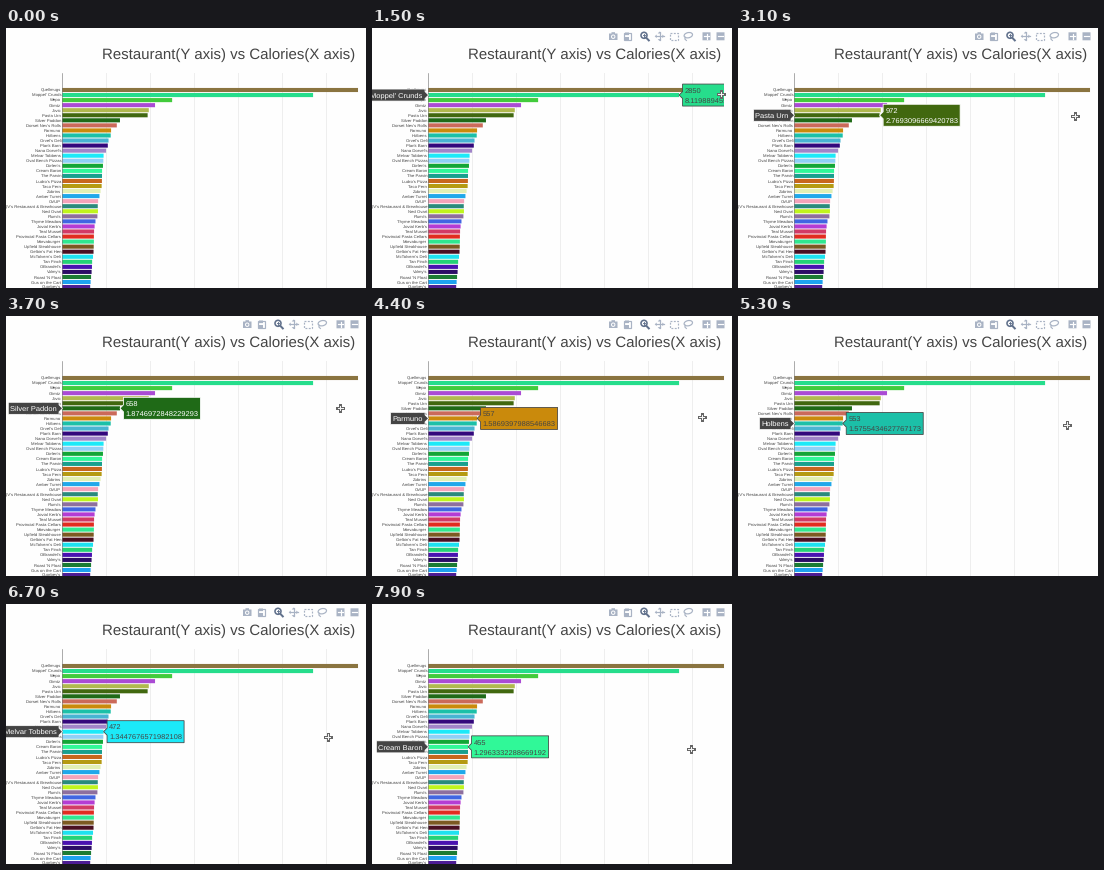
Write a matplotlib script that moves like this. It is 360 px wide and 260 px high and loops after 8000 ms.

```python
import matplotlib.pyplot as plt
import numpy as np
from matplotlib.animation import FuncAnimation
from matplotlib.patches import Circle, Ellipse, Polygon, Rectangle

W, H, DPI = 360, 260, 100
PT = 72 / DPI            # points per pixel
X0, Y0 = 56, 62          # left end and centre of the first bar
SCALE, PITCH = 0.0881, 5.053
MEAN = 350.99
CLIP_X = 352
DARK, ICON, ACTIVE = "#444444", "#a9b3c4", "#61718c"

plt.rcParams.update({"font.family": "Liberation Sans", "text.hinting": "none"})

BARS = [
    ("Quellmugs", 3360, "#8a7440"), ("Moppel' Crunds", 2850, "#26dd8c"),
    ("Wepo", 1250, "#42cb3c"), ("Glimtz", 1056, "#aa4bd4"),
    ("Jovic", 985, "#b0b94e"), ("Pasta Urn", 972, "#41680f"),
    ("Silver Paddon", 658, "#1f6a17"), ("Dorset Nev's Rolls", 622, "#cb6a5a"),
    ("Parmuno", 557, "#ca8a0c"), ("Holbens", 553, "#1cc0a8"),
    ("Orvel's Deli", 528, "#48b4d2"), ("Plank Barn", 520, "#33087c"),
    ("Nana Dorvel's", 500, "#a084c8"), ("Melvar Tobbens", 472, "#1ce9f8"),
    ("Oval Bench Pizzas", 469, "#8fd0f6"), ("Dorlen's", 465, "#12a636"),
    ("Cream Baron", 455, "#30f898"), ("The Parvin", 454, "#18a08e"),
    ("Ludro's Pizza", 453, "#c8661e"), ("Taco Fern", 450, "#b59a12"),
    ("Zubrins", 438, "#e2efb4"), ("Amber Turret", 425, "#20a8ea"),
    ("OVUP", 410, "#f4a3ba"), ("QV's Restaurant & Brewhouse", 406, "#2a8a7c"),
    ("Ned Ovart", 408, "#c0f51d"), ("Plumi's", 402, "#8e6f9e"),
    ("Thyme Meadow", 380, "#4166e2"), ("Jovial Kerb's", 370, "#b43cd4"),
    ("Teal Mussel", 364, "#d23a66"), ("Provincial Pasta Cellars", 362, "#e22c20"),
    ("Morvaburger", 362, "#30e890"), ("Upfield Steakhouse", 360, "#7c5a22"),
    ("Gelbin's Fat Hen", 358, "#4a1022"), ("McTolvern's Deli", 352, "#1ee2f0"),
    ("Tan Finch", 342, "#24d276"), ("O'Brandel's", 340, "#4a12b0"),
    ("Volmy's", 336, "#2c0c66"), ("Roast 'N Float", 330, "#1c7c34"),
    ("Gus on the Cart", 325, "#1ea2f0"), ("Quorbey's", 320, "#4c1c94"),
]

# Frame at which each hover starts, and the bar under the pointer
HOVER_AT = [0, 8, 15, 17, 19, 20, 22, 36, 39, 43, 48, 54, 56, 60, 64, 71, 73, 76]
HOVER_BAR = [None] + list(range(17))

# Pointer path
PATH_T = [7, 10, 15, 23, 31, 34, 44, 51, 53, 58, 61, 67, 70, 79]
PATH_X = [356, 354, 348.5, 342, 336.5, 336.5, 329.5, 328.5, 328.5, 326.5,
          325, 321.5, 321.5, 318.5]
PATH_Y = [50, 61, 66, 83, 88, 88, 101, 108.5, 108.5, 118.5, 123, 132.5, 132.5, 145]
BAR_OFF, POINTER_ON = 6, 7

fig = plt.figure(figsize=(W / DPI, H / DPI), dpi=DPI, facecolor="#fefefe")
ax = fig.add_axes([0, 0, 1, 1])
ax.set(xlim=(0, W), ylim=(H, 0))
ax.axis("off")


def bar_y(k):
    return Y0 + k * PITCH


def label(x, y, s, px, color=DARK, **kw):
    """Text whose capitals are centred on y."""
    return ax.text(x, y + 0.36 * px, s, fontsize=px * PT, color=color,
                   va="baseline", **kw)


def stroke(xs, ys, color, px, z=2, **kw):
    return ax.plot(xs, ys, color=color, lw=px * PT, zorder=z, **kw)[0]


def add(patch):
    return ax.add_patch(patch)


def draw_chart():
    for k in range(1, 7):
        x = X0 + 500 * k * SCALE
        stroke([x, x], [45, H], "#eeeeee", 1, 0)
    for k, (name, cal, color) in enumerate(BARS):
        add(Rectangle((X0, bar_y(k) - 2.05), cal * SCALE, 4.1, fc=color, lw=0,
                      snap=False, zorder=1))
        label(X0 - 0.8, bar_y(k), name, 4.3, ha="right")
    stroke([X0, X0], [45, H], "#777777", 0.6)
    label(96, 25.5, "Restaurant(Y axis) vs Calories(X axis)", 15)


def draw_toolbar():
    def fill(x, y, w, h, color=ICON):
        return add(Rectangle((x, y), w, h, fc=color, lw=0, snap=False, zorder=3))

    def ring(cls, *args, color=ICON, px=1.2, **kw):
        return add(cls(*args, fc="none", ec=color, lw=px * PT, zorder=3, **kw))

    def hole(x, y, r):
        return add(Circle((x, y), r, fc="white", lw=0, zorder=4))

    parts = [
        # camera
        fill(237, 5.5, 8.5, 6.5), fill(239.5, 4.2, 3.5, 2),
        hole(241.2, 8.7, 2.2),
        add(Circle((241.2, 8.7), 1.2, fc=ICON, lw=0, zorder=5)),
        # disk
        ring(Rectangle, (251.5, 4.5), 7, 7.5),
        fill(253, 4.5, 4, 2.6), fill(253, 9, 4, 3),
        # zoom
        ring(Circle, (272, 7.3), 3, color=ACTIVE, px=1.6),
        stroke([274.2, 276.8], [9.7, 12.4], ACTIVE, 2, 3),
        stroke([270.6, 273.4], [7.3, 7.3], ACTIVE, 0.9, 3),
        stroke([272, 272], [5.9, 8.7], ACTIVE, 0.9, 3),
        # pan
        stroke([283.5, 291.5], [8.3, 8.3], ICON, 1.2, 3),
        stroke([287.5, 287.5], [4.3, 12.3], ICON, 1.2, 3),
        # box select
        ring(Rectangle, (297.5, 4.5), 8, 7.5, ls=(0, (1.6, 1.2))),
        # lasso
        ring(Ellipse, (316.3, 7.2), 8.5, 5.2, angle=-12),
        stroke([313.4, 312.8, 314.4], [9.2, 11, 12.5], ICON, 1.1, 3),
    ]
    for x in (334.5, 348.5):
        parts += [fill(x - 4, 4.3, 8, 8),
                  stroke([x - 2.4, x + 2.4], [8.3, 8.3], "white", 1.2, 4)]
    parts.append(stroke([334.5, 334.5], [5.9, 10.7], "white", 1.2, 4))
    for dx, dy in ((1, 0), (-1, 0), (0, 1), (0, -1)):
        tip = np.array([287.5 + 4.8 * dx, 8.3 + 4.8 * dy])
        back, side = np.array([dx, dy]) * 2, np.array([dy, dx]) * 1.8
        parts.append(add(Polygon([tip, tip - back + side, tip - back - side],
                                 fc=ICON, lw=0, zorder=3)))
    return parts


def callout(x, y, width, half, side):
    """Outline of a box whose arrow points at (x, y)."""
    near, far = x + 3.5 * side, x + (3.5 + width) * side
    return [(x, y), (near, y - 3.5), (near, y - half), (far, y - half),
            (far, y + half), (near, y + half), (near, y + 3.5)]


def is_dark(color):
    r, g, b = (int(color[k:k + 2], 16) for k in (1, 3, 5))
    return 0.299 * r + 0.587 * g + 0.114 * b < 128


draw_chart()
toolbar = draw_toolbar()

tag = add(Polygon([(0, 0)] * 3, fc=DARK, ec="white", lw=0.7 * PT, zorder=6))
tag_text = label(0, 0, "", 7.5, "white", ha="right", zorder=7)
tip = add(Polygon([(0, 0)] * 3, lw=0.8 * PT, zorder=6))
tip_lines = [label(0, 0, "", 7.5, zorder=7, clip_on=True) for _ in range(2)]
for part in [tip, *tip_lines]:
    part.set_clip_path(Rectangle((0, 0), CLIP_X, H, transform=ax.transData))

pointer = [stroke([], [], color, px, z)
           for color, px, z in (("#666666", 3, 8), ("#f4f4f4", 1, 9))]


def text_width(text):
    return text.get_window_extent().width * DPI / fig.dpi


def show_hover(k):
    parts = [tag, tag_text, tip, *tip_lines]
    for part in parts:
        part.set_visible(k is not None)
    if k is None:
        return
    name, cal, color = BARS[k]
    y, end = bar_y(k), X0 + cal * SCALE
    ink = "white" if is_dark(color) else DARK

    tag_text.set_text(name)
    tag_text.set_position((X0 - 5.5, y + 2.7))
    tag.set_xy(callout(X0 + 0.5, y, text_width(tag_text) + 4, 6, -1))

    for line, s, dy in zip(tip_lines, (cal, cal / MEAN), (-5, 5)):
        line.set_text(str(s))
        line.set_position((end + 5.6, y + dy + 2.7))
        line.set_color(ink)
    tip.set_xy(callout(end, y, text_width(tip_lines[1]) + 4, 11, 1))
    tip.set_facecolor(color)
    tip.set_edgecolor(ink)


def show_pointer(i):
    x, y = np.interp(i, PATH_T, PATH_X), np.interp(i, PATH_T, PATH_Y)
    for line, r in zip(pointer, (3, 2.4)):
        line.set_data([x - r, x + r, np.nan, x, x], [y, y, np.nan, y - r, y + r])
        line.set_visible(i >= POINTER_ON)


def update(i):
    for part in toolbar:
        part.set_visible(i >= BAR_OFF)
    show_hover(HOVER_BAR[np.searchsorted(HOVER_AT, i, side="right") - 1])
    show_pointer(i)
    return []


anim = FuncAnimation(fig, update, frames=80, interval=100, repeat=True,
                     repeat_delay=0, blit=False)
plt.show()
```
